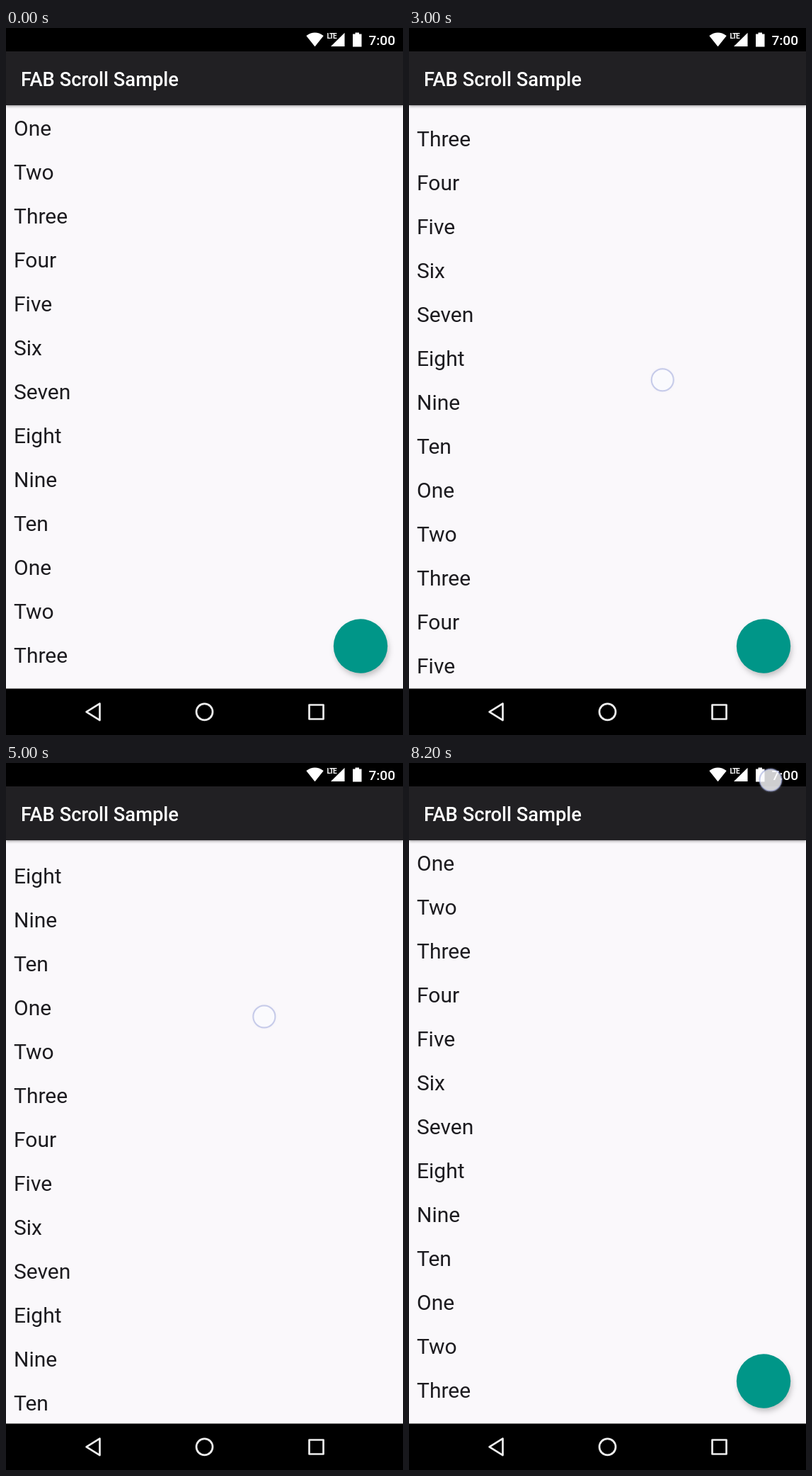
Animation of 561 by 998 pixels, one loop 8300 ms. Source, as an HTML page:

```html
<!DOCTYPE html>
<html lang="en">
<head>
<meta charset="utf-8">
<title>FAB Scroll Sample</title>
<style>
  html, body { margin: 0; width: 100%; height: 100%; overflow: hidden; background: #faf8fb; }
  body { position: relative; font-family: Roboto, sans-serif; }
  body > * { position: absolute; left: 0; }
  #view { top: 109px; width: 561px; height: 824px; overflow: hidden; }
  #list { padding: 2px 0 0 11px; font-size: 30px; line-height: 62px; color: #1c1b1f; }
  #bar {
    top: 33px; width: 561px; height: 76px; box-sizing: border-box; padding-left: 21px;
    font: 500 27.3px/80px Roboto, sans-serif; color: #fff; background: #212023;
    box-shadow: 0 1px 4px rgba(0, 0, 0, .45);
  }
  #chrome { top: 0; }
  #shade { filter: blur(4px); }
  #touch { filter: drop-shadow(0 0 1.5px rgba(200, 205, 235, .4)); }
</style>
</head>
<body>
<div id="view"><div id="list"></div></div>
<div id="bar">FAB Scroll Sample</div>
<svg id="chrome" width="561" height="998" fill="#fff">
  <g id="fab">
    <circle id="shade" cx="2" cy="5" r="37" fill="#000" fill-opacity=".25"/>
    <circle r="38.2" fill="#009688" id="disc"/>
  </g>
  <path fill="#000" d="M0 0H561V33H0ZM0 932.5H561V998H0Z"/>
  <path d="M436.5 26.2L424.3 11Q436.5 2.2 448.7 11Z"/>
  <path d="M478.5 6.7V26H459Z"/>
  <path fill="#000" d="M453 5H468V16.5H453Z"/>
  <text x="453.5" y="15" font-size="10" font-weight="700" letter-spacing="-1">LTE</text>
  <path d="M490 8.5H493.5V6.5H499V8.5H502.5V26.4H490Z"/>
  <text x="550" y="24" font-size="19.1" font-weight="500" text-anchor="end">7:00</text>
  <g fill="none" stroke="#eee" stroke-width="2.7" stroke-linejoin="round">
    <path d="M113.6 965.4L132.5 953.7V977.1Z"/>
    <circle cx="280.5" cy="965.4" r="11.5"/>
    <path d="M428.5 955.5H448.5V975.5H428.5Z"/>
  </g>
  <circle id="touch" r="15.5" fill-opacity=".75" stroke="#96a0d7" stroke-opacity=".5" stroke-width="2"/>
</svg>
<script>
const LOOP = 8300, STEP = 100, MAX_SCROLL = 416, FAB_DELAY = 100, FAB_TIME = 200;
const $ = id => document.getElementById(id);
const clamp = (v, lo, hi) => Math.min(hi, Math.max(lo, v));

const words = 'One Two Three Four Five Six Seven Eight Nine Ten'.split(' ');
$('list').innerHTML = [...words, ...words].map(w => `<div>${w}</div>`).join('');

// The finger moves from `a` to `b`, then rests until `lift`.
// While it drags, scroll = anchor - finger y.
const swipes = [
  { start: 900, stop: 1765, lift: 2400, a: [348, 790], b: [373, 190], anchor: 761.7 },
  { start: 2400, stop: 3585, lift: 4000, a: [371, 190], b: [346, 792], anchor: 605.7 },
  { start: 4400, stop: 5300, lift: 5500, a: [345, 806], b: [372, 197], anchor: 813.5 },
  { start: 5900, stop: 6950, lift: 7300, a: [338, 192], b: [304, 902], anchor: 624.8 }
];
const tap = { start: 8200, lift: LOOP, at: [511, 24] };

const ease = k => k - Math.sin(2 * Math.PI * k) / (4 * Math.PI);

function finger({ start, stop, a, b }, t) {
  const k = ease(clamp((t - start) / (stop - start), 0, 1));
  return a.map((v, i) => v + (b[i] - v) * k);
}

// The button hides on upward swipes and returns on downward ones.
function fabSize(swipe, t) {
  const k = clamp((t - swipe.start - FAB_DELAY) / FAB_TIME, 0, 1);
  return swipe.b[1] > swipe.a[1] ? 1 - (1 - k) ** 2.3 : 1 - k ** 1.64;
}

function draw(t) {
  const swipe = swipes.filter(s => s.start <= t).pop();
  const size = swipe ? fabSize(swipe, t) : 1;
  let point = swipe && finger(swipe, t);
  const scroll = swipe ? clamp(swipe.anchor - point[1], 0, MAX_SCROLL) : 0;
  if (t >= tap.start) point = tap.at;

  $('list').style.transform = `translateY(${-Math.round(scroll)}px)`;
  $('fab').setAttribute('transform', `translate(501 872.5) scale(${size})`);
  $('shade').style.opacity = $('disc').style.opacity = size;

  const down = [swipe, tap].some(s => s && s.start <= t && t < s.lift);
  $('touch').style.display = down ? '' : 'none';
  if (down) $('touch').setAttribute('transform', `translate(${point})`);
}

const begin = performance.now();
function tick() {
  const t = (performance.now() - begin) % LOOP;
  draw(Math.floor(t / STEP) * STEP);
  requestAnimationFrame(tick);
}
tick();
</script>
</body>
</html>
```
